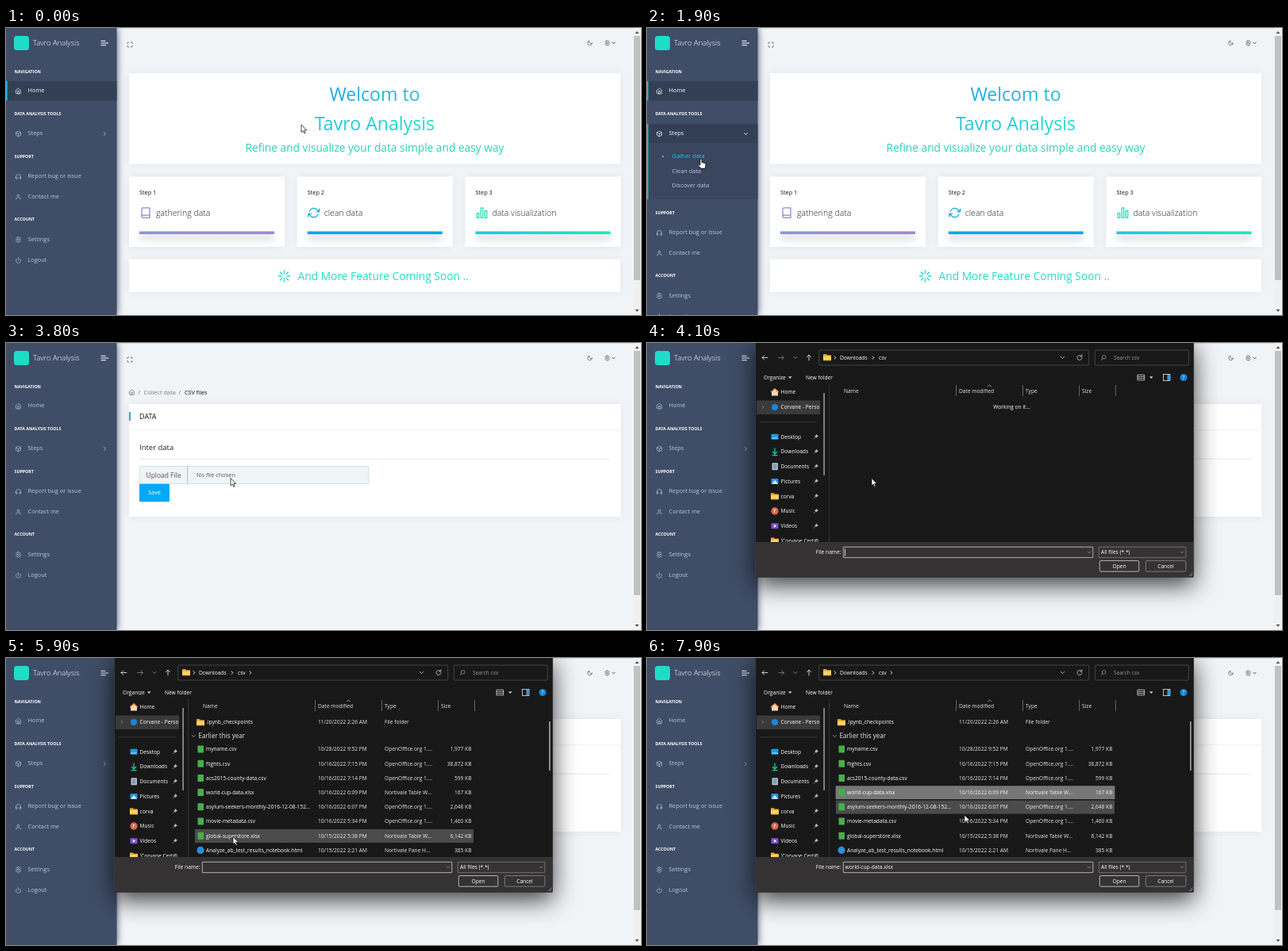
An HTML page that plays this animation: 800x362 px, repeating every 8 s.

```html
<!DOCTYPE html>
<html lang="en">
<head>
<meta charset="utf-8">
<title>Dashboard file upload</title>
<style>
html, body { margin: 0; width: 100%; height: 100%; overflow: hidden; background: #f1f4f7 }
svg { display: block; width: 100vw; height: 100vh; font-family: "Open Sans", "Noto Sans", sans-serif }
text { white-space: pre }
.card { fill: #fff; filter: drop-shadow(0 .5px 5px rgba(69,90,100,.09)) }
.side { fill: #3f4d67; filter: drop-shadow(.5px 0 5px #3f4d67) }
.bar { filter: drop-shadow(0 6px 4px rgba(40,50,70,.3)) }
.dialog { filter: drop-shadow(0 10px 15px rgba(0,0,0,.75)) }
</style>
</head>
<body>
<svg id="stage" viewBox="0 0 800 362"></svg>
<script>
const ICON = {
  home: 'M3 9l9-7 9 7v11a2 2 0 0 1-2 2H5a2 2 0 0 1-2-2zM9 22V12h6v10',
  box: 'M21 16V8a2 2 0 0 0-1-1.7l-7-4a2 2 0 0 0-2 0l-7 4A2 2 0 0 0 3 8v8a2 2 0 0 0 1 1.7l7 4a2 2 0 0 0 2 0l7-4A2 2 0 0 0 21 16zM3.3 7L12 12l8.7-5M12 22V12',
  phones: 'M3 18v-6a9 9 0 0 1 18 0v6M21 19a2 2 0 0 1-2 2h-1a2 2 0 0 1-2-2v-3a2 2 0 0 1 2-2h3zM3 19a2 2 0 0 0 2 2h1a2 2 0 0 0 2-2v-3a2 2 0 0 0-2-2H3z',
  user: 'M20 21v-2a4 4 0 0 0-4-4H8a4 4 0 0 0-4 4v2M8 7a4 4 0 1 0 8 0a4 4 0 1 0-8 0',
  gear: 'M9 12a3 3 0 1 0 6 0a3 3 0 1 0-6 0M10 2h4l1 3 3-1 3 4-2 2v4l2 2-3 4-3-1-1 3h-4l-1-3-3 1-3-4 2-2v-4l-2-2 3-4 3 1z',
  power: 'M18.4 6.6a9 9 0 1 1-12.7 0M12 2v10',
  book: 'M4 19.5A2.5 2.5 0 0 1 6.5 17H20M6.5 2H20v20H6.5A2.5 2.5 0 0 1 4 19.5v-15A2.5 2.5 0 0 1 6.5 2z',
  refresh: 'M23 4v6h-6M1 20v-6h6M3.5 9a9 9 0 0 1 14.9-3.4L23 10M1 14l4.6 4.4A9 9 0 0 0 20.5 15',
  chart: 'M2 13h4v9H2zM10 2h4v20h-4zM18 8h4v14h-4z',
  loader: 'M12 2v5M12 17v5M4.9 4.9l3.5 3.5M15.6 15.6l3.5 3.5M2 12h5M17 12h5M4.9 19.1l3.5-3.5M15.6 8.4l3.5-3.5',
  moon: 'M21 12.8A9 9 0 1 1 11.2 3 7 7 0 0 0 21 12.8z',
  full: 'M8 3H5a2 2 0 0 0-2 2v3m18 0V5a2 2 0 0 0-2-2h-3m0 18h3a2 2 0 0 0 2-2v-3M3 16v3a2 2 0 0 0 2 2h3',
  right: 'M9 6l6 6-6 6', down: 'M6 9l6 6 6-6',
  back: 'M21 12H3M10 5l-7 7 7 7', next: 'M3 12h18M14 5l7 7-7 7', up: 'M12 21V3M5 10l7-7 7 7',
  reload: 'M20 12a8 8 0 1 1-3-6.2M20 2v6h-6',
  search: 'M4 10a7 7 0 1 0 14 0a7 7 0 1 0-14 0M6 15l-5 6',
  pin: 'M14 3l7 7-4 1-4 5-6-6 5-4zM9 14l-7 7',
  list: 'M1 3h22v18H1zM1 9h22M1 15h22'
};

const rect = (x, y, w, h, fill, more = '') =>
  `<rect x="${x}" y="${y}" width="${w}" height="${h}" fill="${fill}" ${more}/>`;
const box = (x, y, w, h, fill, line, r = 1) =>
  rect(x, y, w, h, fill, `stroke="${line}" stroke-width=".7" rx="${r}"`);
const circle = (x, y, r, fill) => `<circle cx="${x}" cy="${y}" r="${r}" fill="${fill}"/>`;
// y is the vertical middle of the capitals
const text = (x, y, s, size, fill, more = '') =>
  `<text x="${x}" y="${y + size * .36}" font-size="${size}" fill="${fill}" ${more}>${s}</text>`;
const path = (d, color, w = .8, more = '') =>
  `<path d="${d}" fill="none" stroke="${color}" stroke-width="${w}" ${more}/>`;
const icon = (name, x, y, size, color, w = 2, more = '') =>
  `<g transform="translate(${x - size / 2} ${y - size / 2}) scale(${size / 24})" stroke-linecap="round" stroke-linejoin="round">${path(ICON[name], color, w, more)}</g>`;
const group = (id, body, more = '') => `<g id="${id}" ${more}>${body}</g>`;
const fade = (id, a, b) =>
  `<linearGradient id="${id}"><stop stop-color="${a}"/><stop offset="1" stop-color="${b}"/></linearGradient>`;
const card = (x, y, w, h) => rect(x, y, w, h, '#fff', 'class="card"');

const PALE = '#b9c6dd', CYAN = '#1dc4e9', WHITE = '#fff', MIDDLE = 'text-anchor="middle"';
const LIST = '#191819', FOOT = '#343233';

function topBar() {
  return rect(0, 0, 800, .7, '#d8d2d8') +
    icon('full', 156, 21, 8, '#333') + icon('moon', 735.5, 19, 7.5, '#444') +
    icon('gear', 757.5, 19, 7.5, '#444') + icon('down', 765.5, 19, 7, '#333', 3) +
    rect(790, 0, 10, 362, '#f1f1f1') + rect(791, 10, 8, 308, '#c1c1c1') +
    '<path d="M792.5 7l2.5-3 2.5 3zM792.5 355l2.5 3 2.5-3z" fill="#555"/>';
}

function step(i, title, name, color, fill) {
  const x = 155 + i * 211.75;
  return card(x, 187.5, 196, 88.5) + text(x + 13, 207.5, 'Step ' + (i + 1), 7.3, '#111') +
    icon(name, x + 21, 233, 15, color) + text(x + 34, 233, title, 10.5, '#222', 'font-weight="300"') +
    rect(x + 13, 256.5, 170, 3.6, fill, 'class="bar"');
}

function homePage() {
  return card(155, 57, 619, 114.5) +
    text(464.5, 84, 'Welcom to', 23.1, 'url(#sky)', MIDDLE) +
    text(464.5, 120.5, 'Tavro Analysis', 23.1, 'url(#sea)', MIDDLE) +
    text(464.5, 151.5, 'Refine and visualize your data simple and easy way', 13.73, 'url(#mint)', MIDDLE) +
    step(0, 'gathering data', 'book', '#8f86d0', 'url(#violet)') +
    step(1, 'clean data', 'refresh', '#16a9e0', '#0ba6ec') +
    step(2, 'data visualization', 'chart', '#1fdcb8', 'url(#teal)') +
    card(155, 291.5, 619, 41.5) + icon('loader', 350.5, 313, 17, '#1fd9cb') +
    text(367.5, 313, 'And More Feature Coming Soon ..', 13.77, '#22dcc8');
}

function uploadPage() {
  return icon('home', 158.5, 62, 8, '#666') + text(166.5, 62, '/', 7.4, '#777') +
    text(173.5, 62, 'Collect data', 7.4, '#777') + text(217.5, 62, '/', 7.4, '#777') +
    text(225, 62, 'CSV files', 7.3, '#111') +
    card(155, 77, 619.5, 142) + rect(155, 87, 2, 11, '#1cb8b4') +
    text(168, 92.5, 'DATA', 9, '#111') + rect(155, 109.5, 619, .6, '#e9ecf0') +
    text(168, 131.5, 'Inter data', 9.5, '#222') + rect(168, 145.8, 593, .6, '#d8d8da') +
    box(168.3, 155.4, 288.5, 22.2, '#f0f4f6', '#bcd9dd') + rect(228.3, 155.5, .9, 22, '#a9b9bd') +
    text(176.5, 166.5, 'Upload File', 8.45, '#555') + text(240, 166.3, 'No file chosen', 7.4, '#555') +
    rect(168, 177.8, 38, 22.4, '#04a9f5', 'rx="1.3"') + text(179, 188.5, 'Save', 7.4, WHITE);
}

const caption = (y, s) => text(10.5, y, s, 5.3, WHITE, 'font-weight="700"');
const link = (y, name, s, color = PALE) =>
  icon(name, 15.5, y + .5, 8, color) + text(27.5, y - .4, s, 7.4, color);
const active = (y, body) => rect(0, y, 139.5, 24.5, '#333f54') + rect(0, y, 1.6, 24.5, CYAN) + body;

function sidebar() {
  const sub = rect(0, 145, 139.5, 71, '#39465e') + rect(0, 145, 1.6, 71, CYAN) +
    circle(20, 162, 1.2, CYAN) + text(31.5, 161.2, 'Gather data', 7.4, CYAN) +
    text(31.5, 180, 'Clean data', 7.4, PALE) + text(31.5, 198.3, 'Discover data', 7.4, PALE);
  return rect(0, 0, 139.5, 362, '#3f4d67', 'class="side"') +
    rect(10, 10, 19, 18, '#1ddcc8', 'rx="3.5"') +
    text(34, 18.7, 'Tavro Analysis', 9.45, WHITE, 'font-weight="300"') +
    path('M119.5 16.3h6M119.5 19h9.5M119.5 21.7h6.5', WHITE, 1) +
    caption(55, 'NAVIGATION') + link(79, 'home', 'Home') +
    group('homeOn', active(67, link(79, 'home', 'Home', WHITE))) +
    caption(108, 'DATA ANALYSIS TOOLS') +
    group('stepsOff', link(133, 'box', 'Steps') + icon('right', 124.5, 133.5, 8, PALE, 2.5)) +
    group('stepsOn', active(121, link(133, 'box', 'Steps', WHITE) + icon('down', 124.5, 133.5, 8, WHITE, 2.5)) +
      `<g clip-path="url(#subClip)">${sub}</g>`) +
    group('lower', caption(162, 'SUPPORT') + link(187, 'phones', 'Report bug or issue') +
      link(212.5, 'user', 'Contact me') + caption(241.5, 'ACCOUNT') +
      link(266.5, 'gear', 'Settings') + link(292.5, 'power', 'Logout'));
}

const folder = (x, y) =>
  `<path d="M${x - 5} ${y - 4}h4l1 1.3h5v7h-10z" fill="#e0a52c"/>` + rect(x - 5, y - 1.5, 10, 5, '#ffd261', 'rx=".5"');
const label = (x, y, s, more) => text(x, y, s, 6.65, WHITE, more);

const FILES = [
  ['myname.csv', '10/28/2022 9:52 PM', 'OpenOffice.org 1....', '1,977 KB'],
  ['flights.csv', '10/16/2022 7:15 PM', 'OpenOffice.org 1....', '38,872 KB'],
  ['acs2015-county-data.csv', '10/16/2022 7:14 PM', 'OpenOffice.org 1....', '599 KB'],
  ['world-cup-data.xlsx', '10/16/2022 6:09 PM', 'Nortivale Table W...', '167 KB'],
  ['asylum-seekers-monthly-2016-12-08-152...', '10/16/2022 6:07 PM', 'OpenOffice.org 1....', '2,648 KB'],
  ['movie-metadata.csv', '10/16/2022 5:34 PM', 'OpenOffice.org 1....', '1,460 KB'],
  ['global-superstore.xlsx', '10/15/2022 5:38 PM', 'Nortivale Table W...', '6,142 KB'],
  ['Analyze_ab_test_results_notebook.html', '10/15/2022 2:21 AM', 'Nortivale Pane H...', '385 KB']
];
const rowY = i => 115 + i * 18.2;
const fileRow = (y, [name, date, type, size], mark) => mark + label(252, y, name) +
  label(393, y, date, 'opacity=".9"') + label(477, y, type, 'opacity=".9"') +
  label(586.5, y, size, 'text-anchor="end" opacity=".9"');

function places() {
  const tile = (y, c) => rect(156.5, y - 3.5, 9, 7, c, 'rx=".7"');
  const marks = [
    y => tile(y, '#1e9be0') + rect(157.5, y + 1, 7, 1.3, '#8ad7ff'),
    y => path(`M161 ${y - 4.5}v7M158 ${y}l3 3 3-3M157.5 ${y + 4.5}h7`, '#1fc3a0', 1.3),
    y => rect(157.5, y - 4.5, 7.5, 9, '#a9bfd0', 'rx=".7"') + path(`M159 ${y - 2}h4.5M159 ${y}h4.5M159 ${y + 2}h4.5`, '#4b6a85'),
    y => tile(y, '#2292e3') + `<path d="M157 ${y + 3.3}l4-5 4 5z" fill="#d3f0ff"/>`,
    y => folder(161, y),
    y => circle(161, y, 4.7, '#d9674b') + path(`M160.5 ${y + 2}v-4l2 1`, WHITE),
    y => tile(y, '#7a55cf') + `<path d="M160 ${y - 2}l3 2-3 2z" fill="#fff"/>`
  ];
  const names = ['Desktop', 'Downloads', 'Documents', 'Pictures', 'corva', 'Music', 'Videos'];
  return '<path d="M156 62l5-4.5 5 4.5h-1v4.5h-8v-4.5z" fill="#f0d8b8"/>' +
    path('M156 62l5-4.5 5 4.5', '#e5792f', 1.3) + label(168.5, 62, 'Home') +
    rect(138, 72.5, 80, 17.5, '#3a3a3a') + icon('right', 146, 81, 8, '#999') +
    circle(161, 81, 4, '#1b86d8') + label(168.5, 81, 'Corvane - Perso') + rect(142, 99.5, 72, .7, '#444') +
    names.map((s, i) => {
      const y = 118.3 + i * 18.75;
      return marks[i](y) + label(168.5, y, s) + icon('pin', 213, y, 7, '#bbb', 2, 'style="fill:#bbb"');
    }).join('') + folder(161, 249.5) + label(168.5, 249.5, "'Corvane Certifi");
}

function dialog() {
  const heads = [['Name', 248, 389], ['Date modified', 393, 473], ['Type', 477, 544], ['Size', 548, 590]];
  const frame = rect(136.5, -4, 552.5, 299.5, LIST, 'class="dialog" rx="2"') +
    rect(136.5, 251, 552.5, 44.5, FOOT, 'rx="1"') +
    rect(136.5, 0, .6, 295, '#4a4a4a') + rect(688.5, 0, .6, 295, '#4a4a4a');
  const nav = icon('back', 148.5, 18.5, 9, WHITE) + icon('next', 169, 18.5, 9, '#888') +
    icon('down', 187, 18.5, 8, '#bbb') + icon('up', 204, 18.5, 9, WHITE) +
    box(216.7, 9, 340, 19, LIST, '#555') + folder(227, 18) + icon('right', 237, 18.5, 7, WHITE, 3) +
    label(243, 18.2, 'Downloads') + icon('right', 285, 18.5, 7, WHITE, 3) + label(292, 18.2, 'csv') +
    icon('down', 523.5, 18.5, 9, '#ddd') + icon('reload', 545, 18.5, 9, '#ddd') +
    box(564.3, 9, 118, 19, LIST, '#555') + icon('search', 576, 18.5, 8, '#aaa') +
    text(588, 18.2, 'Search csv', 6.65, '#999');
  const tools = label(147, 43.2, 'Organize') +
    '<path d="M178 42.3h4.5l-2.25 2.6zM633 42.3h4.5l-2.25 2.6z" fill="#ccc"/>' +
    label(200, 43.2, 'New folder') + icon('list', 622.5, 43.5, 9, '#ddd') +
    box(650.5, 39.5, 8.5, 8, LIST, WHITE, 0) + rect(655.5, 40, 3.2, 7, '#2a9fe8') +
    circle(676, 43.5, 4.6, '#1583d0') + text(676, 43.5, '?', 6.5, WHITE, MIDDLE);
  const table = rect(229.3, 52, .8, 199, '#3d3d3d') + rect(222.4, 63, 1.4, 104, '#aaa') +
    heads.map(([s, x, end]) => text(x, 60.5, s, 6.65, '#e4e4e4') + rect(end, 53, .8, 14, '#777')).join('') +
    path('M429 55l2.5-2 2.5 2', '#bbb', .7);
  const list = fileRow(81, ['.ipynb_checkpoints', '11/20/2022 2:26 AM', 'File folder', ''], folder(245, 81)) +
    icon('down', 236.5, 98.5, 8, '#ccc') + text(242.5, 98.3, 'Earlier this year', 8.1, '#e8e8e8') +
    FILES.map((f, i) => fileRow(rowY(i), f, i < 7
      ? rect(241.5, rowY(i) - 4.5, 7.5, 9, '#45b04b', 'rx=".7"')
      : circle(245, rowY(i), 4.6, '#2a8fd4'))).join('') +
    rect(684.2, 80, 1.4, 62, '#bbb');
  const foot = label(244.5, 264, 'File name:', 'text-anchor="end"') +
    box(247.3, 257.3, 314.5, 13.4, FOOT, '#e8e8e8', .5) + icon('down', 557, 264, 7, '#bbb') +
    box(569.3, 257.3, 109.5, 13.4, FOOT, '#8a8a8a', .5) + label(572, 264, 'All files (*.*)') + icon('down', 674, 264, 7, '#bbb') +
    box(570.3, 274.6, 49.5, 13.6, FOOT, '#eee', 1.5) + label(595, 281.3, 'Open', MIDDLE) +
    box(628.4, 274.6, 50.5, 13.6, FOOT, '#999', 1.5) + label(653.5, 281.3, 'Cancel', MIDDLE) +
    path('M683 294l4.5-4.5M685 294l2.5-2.5', '#999', .8);
  return frame + nav + tools + `<g clip-path="url(#placesClip)">${places()}</g>` + table +
    group('working', label(459.5, 81, 'Working on it...', MIDDLE)) +
    group('listing', icon('right', 308, 18.5, 7, WHITE, 3) + rect(238, 0, 351, 17, '#4b4b4b', 'id="hover"') +
      rect(238, rowY(3) - 7.8, 351, 16, '#777', 'id="picked" stroke="#999" stroke-width=".5"') + list) +
    foot + rect(249, 259.5, .8, 9, WHITE, 'id="caret"') + group('chosen', label(249.5, 264, FILES[3][0]));
}

stage.innerHTML = '<defs>' + fade('sky', '#1fa9ea', '#25bfd8') + fade('sea', '#22c3e4', '#22dcc9') +
  fade('mint', '#25cfc0', '#25d8b0') + fade('violet', '#8d95d4', '#9f88d2') + fade('teal', '#1dc8e4', '#1de9b6') +
  '<clipPath id="subClip"><rect id="subRect" y="145" width="140" height="0"/></clipPath>' +
  '<clipPath id="placesClip"><rect x="137" y="52" width="81.5" height="199"/></clipPath></defs>' +
  rect(0, 0, 800, 362, '#f1f4f7') + group('homeView', homePage()) + group('uploadView', uploadPage()) +
  topBar() + sidebar() + group('picker', dialog()) +
  group('pointer',
    '<path id="arrow" d="M0 0v9.5l2.2-2 1.6 3.5 1.5-.7-1.6-3.4h3z" fill="#fff" stroke="#000" stroke-width=".7"/>' +
    '<path id="hand" d="M0 .6q1-1.2 2 0v4l4 1q1 .3 1 1.5l-.7 5H1l-3.5-4q0-1.5 1.5-.8l1 .8z" fill="#fff" stroke="#000" stroke-width=".7"/>');

const $ = id => document.getElementById(id);
const show = (id, on) => $(id).setAttribute('display', on ? 'inline' : 'none');

// time, x, y of the pointer tip
const TRACK = [
  [0, 372, 122], [100, 372, 122], [800, 74, 130], [1500, 74, 130], [1900, 67, 165], [2400, 67, 165],
  [3200, 250, 183], [3300, 250, 183], [3800, 283, 170.5], [5600, 283, 171], [5800, 286, 225.5],
  [6300, 286, 225.5], [6700, 287, 204], [7100, 287, 204], [7200, 287, 191], [7300, 288, 184],
  [7500, 291, 168], [7700, 292, 170], [7800, 350, 188], [7900, 400, 198]
];
function tip(t) {
  const i = TRACK.findIndex(k => k[0] >= t), b = TRACK[i], a = TRACK[Math.max(0, i - 1)];
  const f = (t - a[0]) / (b[0] - a[0] || 1);
  return [a[1] + (b[1] - a[1]) * f, a[2] + (b[2] - a[2]) * f];
}

function draw(t) {
  const loaded = t >= 2200, open = t >= 900 && !loaded, listed = t >= 4400, picked = t >= 7700;
  const slide = open ? Math.min(1, (t - 800) / 500) * 71 : 0;
  show('homeView', !loaded);
  show('homeOn', !loaded);
  show('uploadView', loaded);
  show('stepsOn', open);
  show('stepsOff', !open);
  $('subRect').setAttribute('height', slide);
  $('lower').setAttribute('transform', `translate(0 ${slide})`);

  show('picker', t >= 4000);
  show('working', !listed);
  show('listing', listed);
  show('picked', picked);
  show('chosen', picked);
  show('caret', !picked && (t < 4700 || (t - 4200) % 1000 < 500));
  // the row highlight trails the pointer by one step
  const row = Math.round((tip(Math.max(0, t - 100))[1] - rowY(0)) / 18.2);
  $('hover').setAttribute('y', rowY(row) - 8.2);

  const [x, y] = tip(t), hand = x < 139 && t < 2300;
  $('pointer').setAttribute('transform', `translate(${x} ${y})`);
  show('hand', hand);
  show('arrow', !hand);
}

function tick() {
  draw(Math.floor(performance.now() % 8000 / 100) * 100);
  requestAnimationFrame(tick);
}
tick();
</script>
</body>
</html>
```
